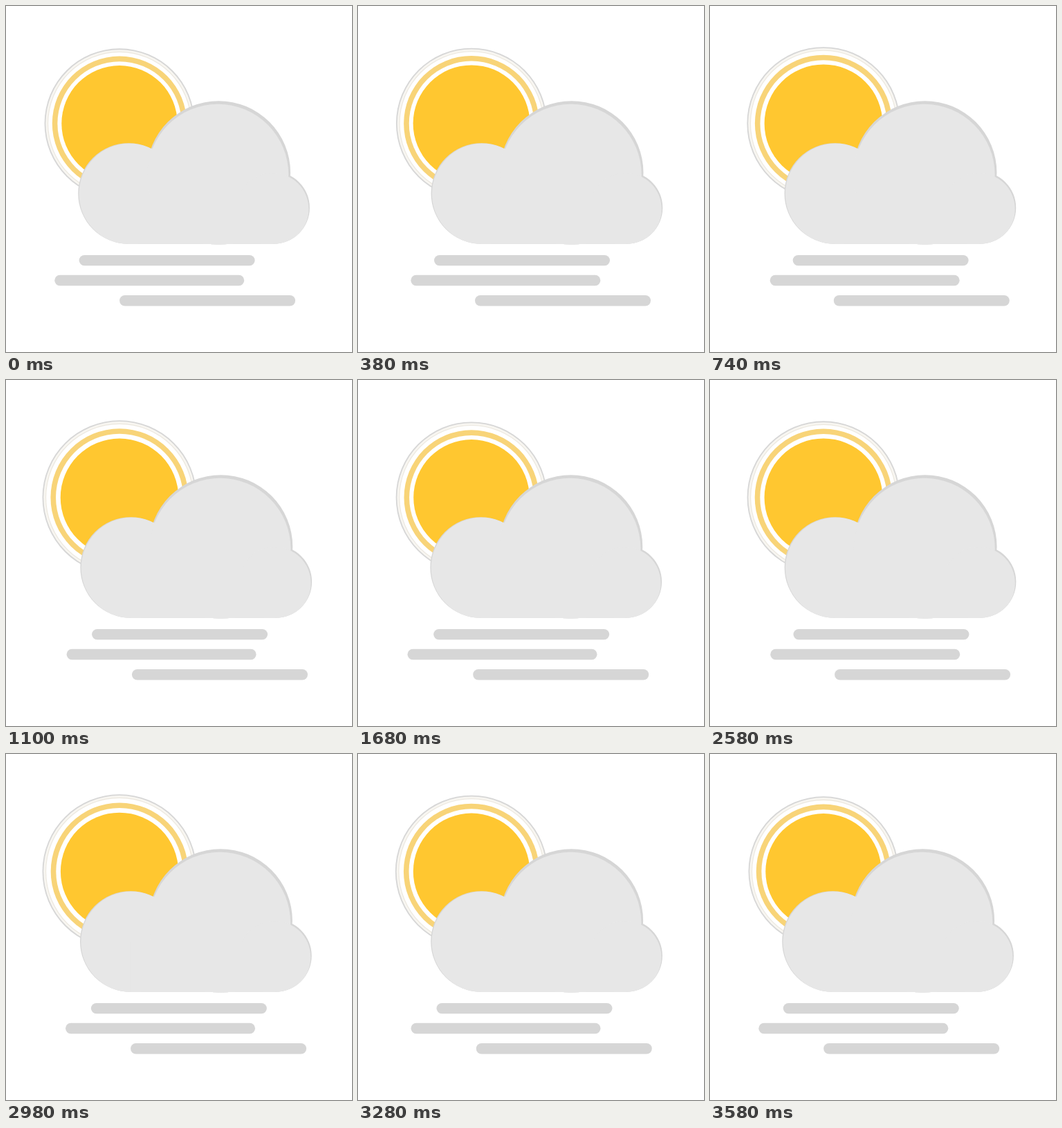
Animation of 500 by 500 pixels, one loop 3600 ms. Source, as an HTML page with a canvas:

```html
<!DOCTYPE html>
<html lang="en">
<head>
<meta charset="utf-8">
<title>Hazy sun</title>
<style>
  html, body { margin: 0; width: 100%; height: 100%; overflow: hidden; background: #fff; }
  canvas { display: block; width: 500px; height: 500px; }
</style>
</head>
<body>
<canvas id="stage" width="500" height="500"></canvas>
<script>
const ctx = document.getElementById('stage').getContext('2d');
const LOOP = 3600;
const SHADE = '#d6d6d6';
const LIGHT = '#e7e7e7';
const SUN = { x: 164, y: 169.8 };

// Turning points of each sway: low, high, low, high, low (the last meets the first).
const SWAY = {
  lead: [0, 900, 1800, 2700],
  middle: [30, 1030, 1870, 2790],
  trail: [60, 1120, 2010, 2960]
};

const BARS = [
  { x: 105.5, y: 359.9, width: 254, reach: 18.6, turns: [40, 1080, 1930, 2850] },
  { x: 70.2, y: 388.8, width: 274, reach: 18.7, turns: [20, 950, 1830, 2760] },
  { x: 164, y: 418, width: 254, reach: 18.3, turns: SWAY.middle }
];

// Eased value from 0 to 1 and back, twice per loop.
function sway(time, turns) {
  const t = time < turns[0] ? time + LOOP : time;
  const stops = [...turns, turns[0] + LOOP];
  let i = 0;
  while (i < 3 && t >= stops[i + 1]) i++;
  const part = (t - stops[i]) / (stops[i + 1] - stops[i]);
  const eased = (1 - Math.cos(Math.PI * part)) / 2;
  return i % 2 ? 1 - eased : eased;
}

function disc(x, y, radius, color) {
  ctx.fillStyle = color;
  ctx.beginPath();
  ctx.arc(x, y, radius, 0, Math.PI * 2);
  ctx.fill();
}

function sunDisc(radius, color) {
  disc(SUN.x, SUN.y, radius, color);
}

function drawSun(time) {
  const halo = 3.1 * sway(time, SWAY.trail);
  const ring = 2.4 * sway(time, SWAY.middle);
  const core = 1.8 * sway(time, SWAY.lead);
  sunDisc(108.4 + halo, SHADE);
  sunDisc(106.6 + halo, '#f8f6f1');
  sunDisc(103.9 + halo, '#ebe7de');
  sunDisc(102.8 + halo, '#fff');
  sunDisc(97.2 + ring, '#f8d478');
  sunDisc(89.6 + ring, '#fff');
  sunDisc(83.7 + core, '#ffc730');
}

function cloudPath() {
  const path = new Path2D();
  const lobe = (x, y, r) => {
    path.moveTo(x + r, y);
    path.arc(x, y, r, 0, Math.PI * 2);
  };
  lobe(177, 271, 72.8);
  lobe(307.3, 241, 103.8);
  lobe(386.7, 291.6, 52.2);
  path.rect(177, 271, 209.7, 72.8);
  return path;
}

const CLOUD = cloudPath();

function drawCloud(time) {
  ctx.save();
  ctx.translate(3.6 * sway(time, SWAY.lead), 0);
  ctx.fillStyle = SHADE;
  ctx.fill(CLOUD);
  ctx.clip(CLOUD);
  disc(178.5, 271.5, 73, LIGHT);
  disc(306.3, 243.8, 102, LIGHT);
  disc(385.2, 293.5, 52.2, LIGHT);
  ctx.fillRect(177, 271, 209, 74);
  ctx.restore();
}

function drawBar(bar, time) {
  ctx.fillStyle = SHADE;
  ctx.beginPath();
  ctx.roundRect(bar.x + bar.reach * sway(time, bar.turns), bar.y, bar.width, 15.4, 7.7);
  ctx.fill();
}

function draw(time) {
  ctx.fillStyle = '#fff';
  ctx.fillRect(0, 0, 500, 500);
  drawSun(time);
  drawCloud(time);
  BARS.forEach(bar => drawBar(bar, time));
}

const start = performance.now();
function tick() {
  draw((performance.now() - start) % LOOP);
  requestAnimationFrame(tick);
}
tick();
</script>
</body>
</html>
```
